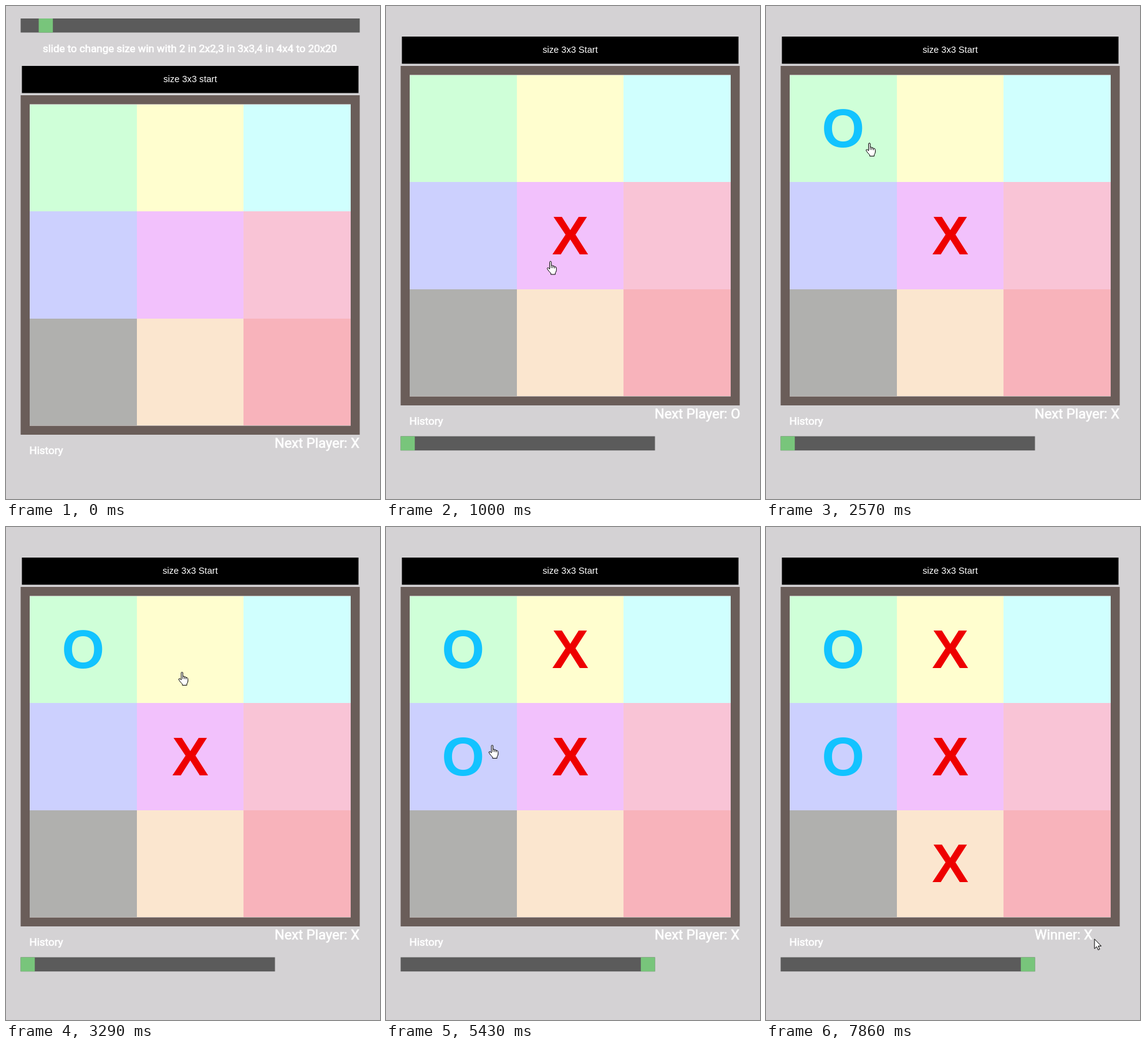
Write an HTML page that moves like this. It is 600 px wide and 790 px high and loops after 8000 ms.

```html
<!DOCTYPE html>
<html lang="en">
<head>
<meta charset="utf-8">
<title>Grid game</title>
<style>
  html, body { margin: 0; width: 100%; height: 100%; overflow: hidden; background: #d4d2d4; }
  svg { display: block; width: 600px; height: 790px; }
  .label { font-family: Roboto, sans-serif; fill: #fff; stroke: #fff; stroke-width: .6px; }
  .button { font: 14.6px "Liberation Sans", Arial, sans-serif; fill: #fff; text-anchor: middle; }
  .mark { font: bold 88px "Liberation Sans", Arial, sans-serif; text-anchor: middle; }
</style>
</head>
<body>
<svg id="stage" viewBox="0 0 600 790">
  <rect width="600" height="790" fill="#d4d2d4"/>
  <g id="setup">
    <rect x="23.5" y="20" width="544" height="22.5" fill="#5b5b5b"/>
    <rect x="52.5" y="20" width="22.7" height="22.5" fill="#78c57b"/>
    <text class="label" x="59" y="73.5" font-size="16.95">slide to change size win with 2 in 2x2,3 in 3x3,4 in 4x4 to 20x20</text>
  </g>
  <g id="game">
    <rect x="25.5" y="96" width="540" height="43.5"/>
    <text id="title" class="button" x="295.5" y="122.3"></text>
    <rect x="23.5" y="143" width="544" height="544" fill="#6a5d59"/>
    <rect x="38" y="157.5" width="515" height="515" fill="#fff"/>
    <g id="cells"></g>
    <g id="marks"></g>
    <text class="label" x="37.5" y="718" font-size="17">History</text>
    <text id="status" class="label" x="431" y="708" font-size="22"></text>
  </g>
  <g id="history">
    <rect x="23.5" y="689.5" width="408" height="22.7" fill="#5b5b5b"/>
    <rect id="thumb" y="689.5" width="22.7" height="22.7" fill="#78c57b"/>
  </g>
  <g id="cursor" fill="#fff" stroke="#000" stroke-linejoin="round">
    <g id="hand">
      <path d="M4.6 2Q4.6 .6 5.9 .6T7.2 2V7.4Q8.6 6.4 9.8 7.8V8.4Q11.2 7.4 12.4 8.8V9.6Q13.8 8.6 15 10.2Q15.4 11.4 15.4 13V15Q15 17.8 13.6 19.2V21.6H6.4V19.6Q3.4 17 1 13.2Q.2 11.6 1.2 11Q2.6 10.4 4.6 13Z"/>
      <path d="M7.2 7.4V11.4M9.8 8V11.6M12.4 9.4V12" fill="none" stroke-width=".9"/>
    </g>
    <path id="arrow" d="M.5 .8V16.2L4 12.9L6.4 18.2L8.8 17.1L6.5 12H11.3Z"/>
  </g>
</svg>
<script>
const LOOP = 8000, RATE = 7, CELL = 515 / 3;
const NS = "http://www.w3.org/2000/svg";
const el = id => document.getElementById(id);
const COLORS = ["#cfffd8", "#fffecf", "#d0fffe", "#ccd0fe", "#f2c1fc", "#f9c4d6", "#b0b0ae", "#fbe6cf", "#f8b3bb"];

// moves: tick, cell, player
const MOVES = [[7, 4, "X"], [16, 0, "O"], [25, 1, "X"], [36, 3, "O"], [43, 7, "X"]];

// pointer: tick, x, y
const PATH = [
  [3, 430, 560], [6, 258, 408.5], [10, 258, 408.5], [15, 138, 212], [17, 137, 210],
  [18, 160, 219], [23, 276.5, 232], [31, 276.5, 232], [35, 142, 356], [37, 142, 356],
  [38, 164.5, 349], [42, 284, 560], [44, 286, 562], [46, 440, 646], [48, 540, 664],
  [50, 500, 675], [52, 460, 668], [54, 522, 658], [55, 526.5, 659.5], [56, 526.5, 659.5]
];

function add(parent, tag, attrs) {
  const node = document.createElementNS(NS, tag);
  for (const key in attrs) node.setAttribute(key, attrs[key]);
  return el(parent).appendChild(node);
}

const corner = i => [38 + (i % 3) * CELL, 157.5 + Math.floor(i / 3) * (CELL - .1)];

COLORS.forEach((fill, i) => {
  const [x, y] = corner(i);
  add("cells", "rect", { x, y, width: CELL, height: CELL - .1, fill, "shape-rendering": "crispEdges" });
});

const marks = MOVES.map(([, cell, player]) => {
  const [x, y] = corner(cell);
  const node = add("marks", "text", {
    class: "mark", x: x + CELL / 2, y: y + 115.5, fill: player === "X" ? "#ee0000" : "#12c3ff"
  });
  node.textContent = player;
  return node;
});

const show = (node, on) => node.setAttribute("visibility", on ? "inherit" : "hidden");
const smooth = p => p * p * (3 - 2 * p);

function pointer(tick) {
  const i = PATH.findIndex(p => p[0] > tick);
  if (i < 0) return PATH[PATH.length - 1].slice(1);
  const [t0, x0, y0] = PATH[i - 1], [t1, x1, y1] = PATH[i];
  const p = smooth((tick - t0) / (t1 - t0));
  return [x0 + (x1 - x0) * p, y0 + (y1 - y0) * p];
}

function draw(time) {
  const tick = Math.floor((time + 2) * RATE / 1000);
  const count = MOVES.filter(m => m[0] <= tick).length;
  const playing = count > 0;

  show(el("setup"), !playing);
  show(el("history"), playing);
  el("game").setAttribute("transform", `translate(0 ${playing ? -47 : 0})`);
  el("title").textContent = "size 3x3 " + (playing ? "Start" : "start");
  el("status").textContent = count === MOVES.length ? "Winner: X" : "Next Player: " + "XO"[count % 2];
  el("thumb").setAttribute("x", count < 3 ? 23.5 : 408.8);
  marks.forEach((node, i) => show(node, i < count));

  const visible = tick >= PATH[0][0];
  show(el("cursor"), visible);
  if (!visible) return;
  const [x, y] = pointer(tick);
  const onBoard = y < (playing ? 625 : 672);
  el("cursor").setAttribute("transform", `translate(${x} ${y})`);
  show(el("hand"), onBoard);
  show(el("arrow"), !onBoard);
}

const start = performance.now();
function loop() {
  draw((performance.now() - start) % LOOP);
  requestAnimationFrame(loop);
}
loop();
</script>
</body>
</html>
```
